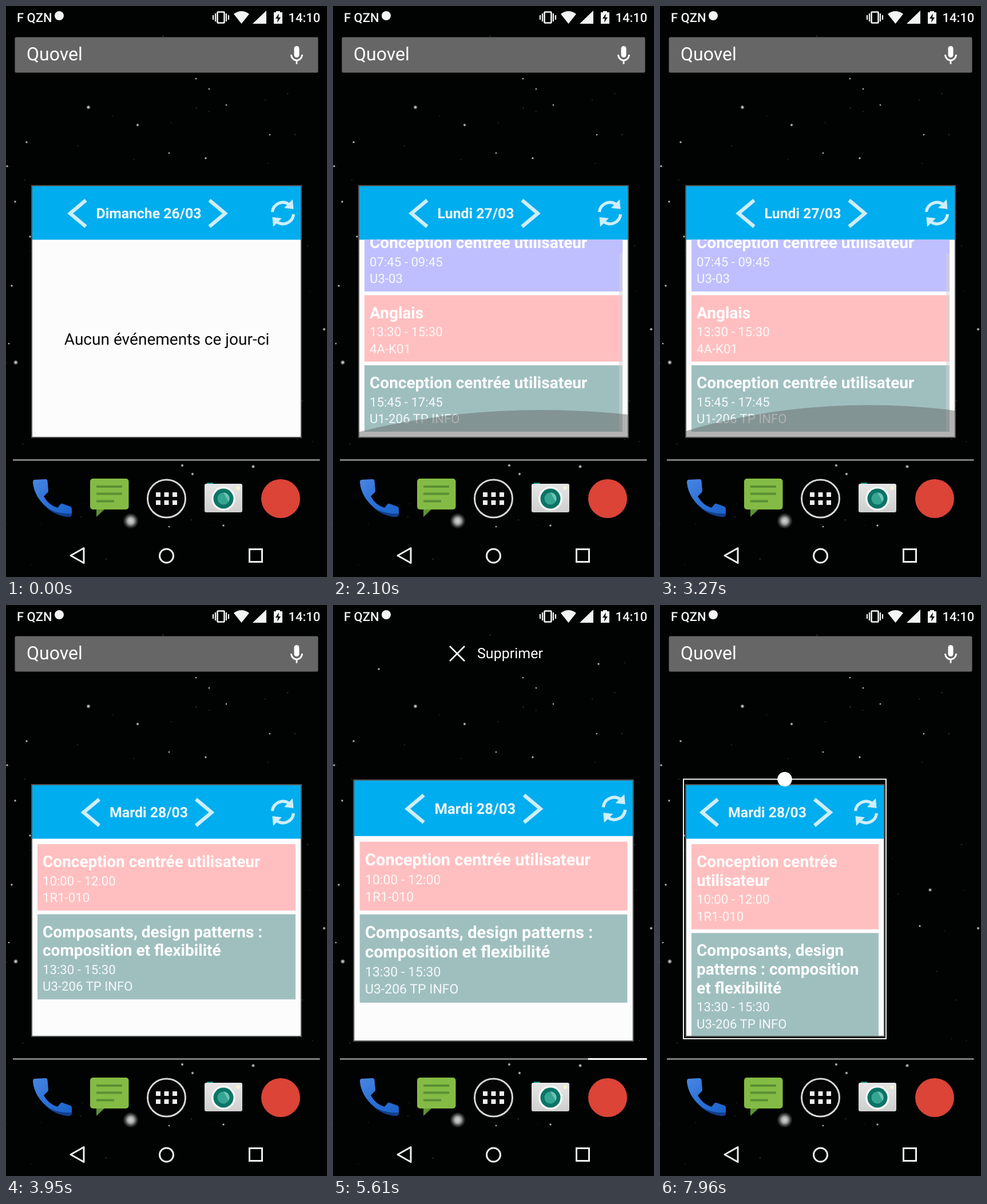
Recreate the animation shown at these times as an HTML page. Size 561 by 998 pixels, loop 8000 ms.

```html
<!DOCTYPE html>
<html lang="fr">
<head>
<meta charset="utf-8">
<title>Agenda widget</title>
<style>
  html, body { margin: 0; width: 100%; height: 100%; overflow: hidden; background: #000; }
  svg { display: block; width: 100%; height: 100%; }
  text { font-family: Roboto, "Noto Sans", sans-serif; fill: #fff; text-rendering: geometricPrecision; }
  .title { font-size: 28px; font-weight: 700; }
  .sub { font-size: 22.2px; fill-opacity: .9; }
  .day { font-size: 24.8px; font-weight: 700; fill: #f3f8fb; text-anchor: middle; }
  .status { font-size: 22px; font-weight: 500; fill: #f4f4f4; }
  .head { stroke: #cfeefb; stroke-width: 6.2; fill: none; }
</style>
</head>
<body>
<svg id="stage" viewBox="0 0 561 998">
  <defs>
    <clipPath id="belowStatus"><rect y="39" width="561" height="959"/></clipPath>
    <radialGradient id="halo">
      <stop offset="0" stop-color="#fff"/><stop offset=".4" stop-color="#ddd" stop-opacity=".9"/>
      <stop offset="1" stop-color="#888" stop-opacity="0"/>
    </radialGradient>
    <linearGradient id="blue" x1="0" y1="0" x2="1" y2="1">
      <stop offset="0" stop-color="#4a86e0"/><stop offset=".5" stop-color="#2a70d8"/><stop offset="1" stop-color="#1b62c8"/>
    </linearGradient>
    <linearGradient id="steel" x2="0" y2="1">
      <stop offset="0" stop-color="#e6e6e6"/><stop offset="1" stop-color="#cfcfcf"/>
    </linearGradient>
  </defs>
  <rect width="561" height="998" fill="#010202"/>
  <g id="stars"></g>

  <g fill="#f4f4f4">
    <text class="status" x="19" y="28">F QZN</text>
    <circle cx="93" cy="17" r="8"/>
    <path d="M362 16v8M366 13v14M385 13v14M389 16v8" stroke="#f4f4f4" stroke-width="2.2"/>
    <rect x="369.5" y="10.5" width="12" height="19" rx="1" fill="none" stroke="#f4f4f4" stroke-width="2.6"/>
    <path d="M411.500 31L398 14Q411.500 4 425 14ZM431 31H455V8Z"/>
    <path d="M468 11h4v-2h7v2h4v20h-15Z"/>
    <path d="M477 13l-6 9h4l-1 7 6-9h-4Z" fill="#000"/>
    <text class="status" x="493.500" y="28">14:10</text>
  </g>

  <g clip-path="url(#belowStatus)">
    <g id="search">
      <rect x="15.500" y="54.500" width="530" height="62" rx="2.500" fill="#666"/>
      <text x="36" y="95" font-size="32" font-weight="400">Quovel</text>
      <rect x="503.500" y="70" width="9" height="20" rx="4.500" fill="#fff"/>
      <path d="M498.500 85a9.500 10 0 0 0 19 0M508 95v6.500" fill="none" stroke="#fff" stroke-width="2.8"/>
    </g>
    <g id="remove">
      <path d="M204 72l26 26M230 72l-26 26" stroke="#fff" stroke-width="2.6"/>
      <text x="252" y="93" font-size="25" style="text-shadow:0 1px 3px #000">Supprimer</text>
    </g>
  </g>

  <g id="widget"></g>

  <g id="resize">
    <rect id="outline" x="41" fill="none" stroke="#f4f4f4" stroke-width="2"/>
    <g id="handles" fill="#fff"></g>
  </g>

  <rect x="12" y="792" width="536.500" height="3" fill="#7d7f7d"/>
  <rect id="page" x="446" y="792" width="102.500" height="3" fill="#fff"/>

  <path d="M50 828L69 827Q72 827 72.500 830L74 847Q74 850 72 851L66 857Q74 872 90 877L95 871Q97 869 99 870L113 875Q115 876 115 879V888Q115 893 109 893C82 890 50 866 47 833Q47 828 50 828Z" fill="url(#blue)"/>
  <path d="M68 874C80 884 96 888 115 887Q115 893 109 893C94 892 78 885 68 874Z" fill="#123f8c"/>
  <path d="M158 878v15l16-15Z" fill="#5f9136"/>
  <rect x="147" y="826" width="67.500" height="54" rx="5" fill="#84bb45"/>
  <path d="M158 840h45M158 852.500h45M158 865.500h31" stroke="#5a8f34" stroke-width="4"/>
  <circle cx="280.500" cy="861" r="33" fill="#050505" stroke="#d8d8d8" stroke-width="3"/>
  <g id="dots" fill="#eee"></g>
  <rect x="351" y="833" width="11" height="5" fill="#00897b"/>
  <rect x="347" y="835" width="66" height="50" rx="3" fill="url(#steel)"/>
  <circle cx="405.500" cy="842.500" r="3.500" fill="#f7f3d6"/>
  <circle cx="380" cy="861" r="21" fill="#f6f6f6"/>
  <circle cx="380" cy="861" r="17.500" fill="#0b7466"/>
  <circle cx="380" cy="861" r="10.500" fill="#35a592"/>
  <path d="M380 850.500a10.500 10.500 0 0 1 9 16Z" fill="#6cc4b4"/>
  <circle cx="480" cy="861" r="34" fill="#db4437"/>

  <g fill="none" stroke="#f0f0f0" stroke-width="3">
    <path d="M113 960.500L136 947.500V973.500Z" stroke-linejoin="round"/>
    <circle cx="280.500" cy="961" r="12"/>
    <rect x="425.500" y="949.500" width="22" height="22"/>
  </g>
</svg>
<script>
const $ = id => document.getElementById(id);
const LOOP = 8000, SCROLL = 35;
const BLUE = '#bfbfff', PINK = '#ffbfc0', TEAL = '#9fbfbf';
const WIDE = 517, NARROW = 393, LIST_TOP = 408.5, LIST_BOTTOM = 753;

// Stars: x, y, radius
const bright = [[144,177,4], [230,208,3], [17,623,4.5], [472,498,3.5], [454,561,2.5], [80,112,2.5],
  [464,103,2.5], [349,266,2.5], [285,257,2], [36,238,2.5], [16,342,2.5], [10,489,2.5], [556,565,3],
  [308,803,3], [432,805,3.5], [326,818,3], [380,908,2.5], [285,910,2], [385,173,2], [332,127,2],
  [355,145,2], [461,225,2], [2,280,2.5], [42,403,2.5], [5,590,2], [218,900,14]];
let seed = 7;
const rnd = () => (seed = seed * 16807 % 2147483647) / 2147483647;
const faint = Array.from({ length: 60 }, () => [rnd() * 561, 50 + rnd() * 930, 1 + rnd()]);
const star = opacity => ([x, y, r]) =>
  `<circle cx="${x}" cy="${y}" r="${r}" fill="url(#halo)" opacity="${opacity}"/>`;
$('stars').innerHTML = faint.map(star(.2)).join('') + bright.map(star(.85)).join('');

$('dots').innerHTML = [262, 276.5, 291].flatMap(x => [850, 864].map(y =>
  `<rect x="${x}" y="${y}" width="8" height="8"/>`)).join('');

const extraHeight = card => (card.lines.length - 1) * 32.8;
const cardHeight = card => 116 + extraHeight(card);

function drawCard(card, y, right) {
  const extra = extraHeight(card);
  return `<rect x="55" y="${y}" width="${right - 66}" height="${cardHeight(card)}" fill="${card.color}"/>` +
    card.lines.map((s, i) => `<text class="title" x="64" y="${y + 40 + i * 32.8}">${s}</text>`).join('') +
    `<text class="sub" x="64" y="${y + 71.5 + extra}">${card.time}</text>` +
    `<text class="sub" x="64" y="${y + 101 + extra}">${card.room}</text>`;
}

function drawView({ id, right, day, half, cards }) {
  const mid = (right - 22) / 2, w = right - 48;
  const chevron = side => {
    const tail = mid + side * (half - 32.5), tip = mid + side * (half - 5);
    return `<path class="head" d="M${tail} 339.500L${tip} 362.500L${tail} 385.500"/>`;
  };
  const arrow = turn => `<g transform="translate(${right - 33} 362) rotate(${turn})">
    <path d="M-18.500 -2A18.500 18.500 0 0 1 11 -15" fill="none" stroke="#cfeefb" stroke-width="5.200"/>
    <path d="M17 -24L18.500 -7L2 -9Z" fill="#cfeefb"/></g>`;
  let y = 418, list = '';
  for (const card of cards) {
    list += drawCard(card, y, right);
    y += cardHeight(card) + 6.5;
  }
  const body = `<rect x="46" y="${LIST_TOP}" width="${w}" height="${LIST_BOTTOM - LIST_TOP}" fill="#fcfcfd"/>`;
  return `<g id="${id}">
    <clipPath id="${id}Clip">${body}</clipPath>
    <rect x="44" y="313" width="${right - 44}" height="442" fill="#555"/>
    <rect x="46" y="315" width="${w}" height="94" fill="#00adee"/>
    ${body}${chevron(-1)}${chevron(1)}${arrow(0)}${arrow(180)}
    <text class="day" x="${mid + 2}" y="371">${day}</text>
    <g clip-path="url(#${id}Clip)"><g id="${id}List">${list}</g><g id="${id}Over"></g></g></g>`;
}

const ucd = ['Conception centrée utilisateur'];
const tuesday = (first, second) => [
  { color: PINK, lines: first, time: '10:00 - 12:00', room: '1R1-010' },
  { color: TEAL, lines: second, time: '13:30 - 15:30', room: 'U3-206 TP INFO' }];
const views = [
  { id: 'sunday', right: WIDE, day: 'Dimanche 26/03', half: 140.5, cards: [] },
  { id: 'monday', right: WIDE, day: 'Lundi 27/03', half: 115.5, cards: [
    { color: BLUE, lines: ucd, time: '07:45 - 09:45', room: 'U3-03' },
    { color: PINK, lines: ['Anglais'], time: '13:30 - 15:30', room: '4A-K01' },
    { color: TEAL, lines: ucd, time: '15:45 - 17:45', room: 'U1-206 TP INFO' }] },
  { id: 'tuesday', right: WIDE, day: 'Mardi 28/03', half: 117,
    cards: tuesday(ucd, ['Composants, design patterns :', 'composition et flexibilité']) },
  { id: 'compact', right: NARROW, day: 'Mardi 28/03', half: 117,
    cards: tuesday(['Conception centrée', 'utilisateur'],
      ['Composants, design', 'patterns : composition', 'et flexibilité']) }];
$('widget').innerHTML = views.map(drawView).join('');
$('sundayOver').innerHTML =
  '<text x="281" y="592" font-size="28.05" text-anchor="middle" style="fill:#0a0a0a">Aucun événements ce jour-ci</text>';
$('mondayOver').innerHTML = `<rect id="bar" x="500" width="6" height="310" fill="#d4d4d4" opacity=".5"/>
  <ellipse id="glowTop" cx="365" rx="703" fill="#666"/><ellipse id="glowBottom" cx="365" rx="703" fill="#666"/>`;
$('handles').innerHTML = ['left', 'top', 'right', 'bottom'].map(k => `<circle id="${k}" r="12.800"/>`).join('');

// Motion: [time, value] steps
const moves = {
  scroll: [[1560, 0], [1800, SCROLL], [2150, SCROLL], [2400, 0], [2900, 0], [3150, SCROLL]],
  glowTop: [[2390, 0], [2590, .58], [2700, .59], [3000, 0]],
  glowBottom: [[1800, 0], [2000, .5], [2150, .5], [2390, 0], [3150, 0], [3270, .59], [3370, .59], [3750, 0]],
  lift: [[4830, 1], [4980, 1.037], [5660, 1.037], [5860, 1]],
  swap: [[4930, 0], [5230, 1], [5660, 1], [5910, 0]],
  page: [[4830, 0], [4980, 1], [5660, 1], [5910, 0]],
  right: [[6050, 520], [6350, 433], [6600, 386], [6840, 381], [6880, 381], [7030, 395]],
  top: [[7760, 310.5], [7960, 304.5]],
  dragRight: [[6050, 0], [6150, 1], [6880, 1], [7030, 0]],
  dragTop: [[7760, 0], [7860, 1]]
};

function at(name, t) {
  const steps = moves[name];
  const i = steps.findIndex(s => s[0] > t);
  if (i === 0) return steps[0][1];
  if (i < 0) return steps[steps.length - 1][1];
  const [[t0, a], [t1, b]] = [steps[i - 1], steps[i]];
  return a + (b - a) * (t - t0) / (t1 - t0);
}

const set = (id, attrs) => { for (const k in attrs) $(id).setAttribute(k, attrs[k]); };

// A flattened circle segment that grows from a list edge
function glow(id, edge, dir, amount) {
  set(id, { cy: edge + dir * (94 - 703) * amount, ry: 703 * amount, opacity: .49 * Math.min(1, amount / .45) });
}

function render(t) {
  const current = t < 340 ? 'sunday' : t < 3760 ? 'monday' : t < 6330 ? 'tuesday' : 'compact';
  for (const v of views) set(v.id, { display: v.id === current ? 'inline' : 'none' });

  const scroll = at('scroll', t);
  set('mondayList', { transform: `translate(0 ${-scroll})` });
  set('bar', { y: 418 + 15 * scroll / SCROLL });
  glow('glowTop', LIST_TOP, 1, at('glowTop', t));
  glow('glowBottom', LIST_BOTTOM, -1, at('glowBottom', t));

  const lift = at('lift', t), swap = at('swap', t);
  set('widget', { transform: `translate(280.5 534) scale(${lift}) translate(-280.5 -534)` });
  set('search', { transform: `translate(0 ${-96 * swap})` });
  set('remove', { transform: `translate(0 ${-78 * (1 - swap)})`, display: swap > 0 ? 'inline' : 'none' });
  set('page', { opacity: at('page', t) });

  const right = at('right', t), top = at('top', t), bottom = 758;
  const dragRight = at('dragRight', t), dragTop = at('dragTop', t);
  const rest = 1 - Math.max(dragRight, dragTop);
  set('resize', { display: t >= 5900 ? 'inline' : 'none' });
  set('outline', { y: top, width: right - 41, height: bottom - top });
  const midX = (41 + right) / 2, midY = 534;
  set('left', { cx: 41, cy: midY, opacity: rest });
  set('right', { cx: right, cy: midY, opacity: 1 - dragTop });
  set('top', { cx: midX, cy: top, opacity: 1 - dragRight });
  set('bottom', { cx: midX, cy: bottom, opacity: rest });
}

const start = performance.now();
function tick() {
  render((performance.now() - start) % LOOP);
  requestAnimationFrame(tick);
}
tick();
</script>
</body>
</html>
```
